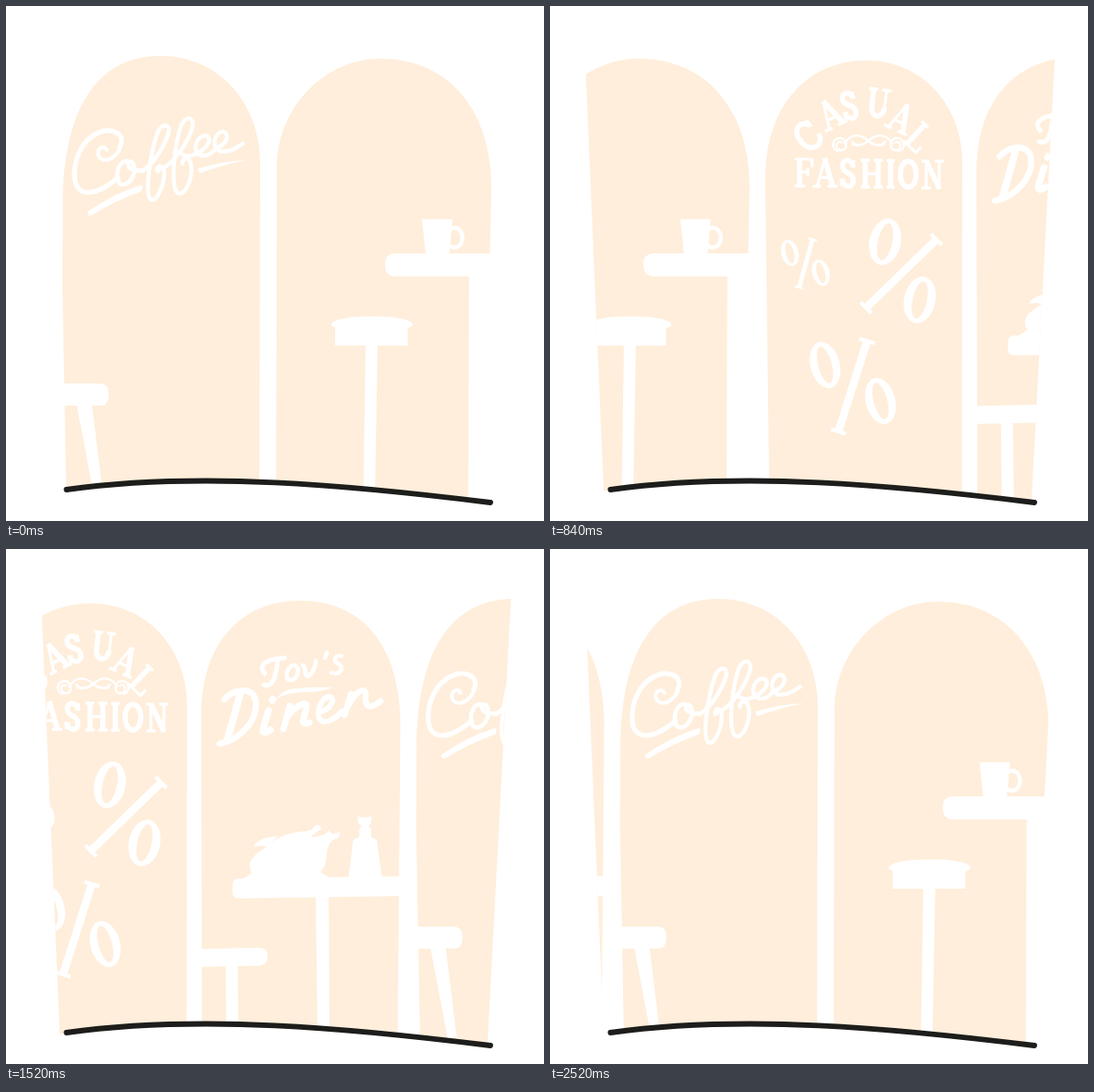
These frames come from a looping animation (582x558 px, 2.56 s). An HTML page with a canvas:

```html
<!DOCTYPE html>
<html lang="en">
<head>
<meta charset="utf-8">
<title>Passing shop windows</title>
<style>
html, body { margin: 0; width: 100%; height: 100%; overflow: hidden; background: #fff; }
canvas { display: block; }
</style>
</head>
<body>
<canvas id="stage" width="582" height="558"></canvas>
<script>
const ctx = document.getElementById('stage').getContext('2d');
const LOOP = 2560, STEP = 40, SPAN = 942;
const CREAM = '#ffeedb', WHITE = '#fff', INK = '#1d1d1b';

const frame = new Path2D('M37.6 45L546.7 45L520.8 538C370 519 210 504 65 524L58.1 526Z');
const ground = new Path2D('M65.5 524C210 504 370 519 524 538');

function fill(path, color = WHITE) {
  ctx.fillStyle = color;
  ctx.fill(new Path2D(path));
}

function stroke(width, path, cap = 'round') {
  ctx.lineWidth = width;
  ctx.lineCap = cap;
  ctx.lineJoin = cap === 'round' ? 'round' : 'miter';
  ctx.strokeStyle = WHITE;
  ctx.stroke(new Path2D(path));
}

// Slab letters, 32 units high: [width, heavy strokes, light strokes]
const GLYPHS = {
  A: [27, 'M13 0L22 31', 'M13 1L5 31M8 21H19M0 30.5H9M16 30.5H27'],
  C: [25, 'M22 9C19 -2 3 -2 3 16C3 34 20 34 23 22', 'M22.5 2V11'],
  F: [21, 'M6 0V32', 'M1 1.5H19.5V10M6 15.5H15M15 11V20M1 30.5H12'],
  H: [26, 'M6 0V32M20 0V32', 'M1 1.5H11M15 1.5H25M1 30.5H11M15 30.5H25M6 16H20'],
  I: [9, 'M4.5 0V32', 'M0 1.5H9M0 30.5H9'],
  L: [21, 'M6 0V32', 'M1 1.5H11M1 30.5H19.5V22'],
  N: [26, 'M6 1L20 31', 'M6 0V32M20 0V32M1 1.5H8M15 1.5H25M1 30.5H11'],
  O: [23, 'M3 16C3 -2.5 20 -2.5 20 16C20 34.5 3 34.5 3 16Z', ''],
  S: [17, 'M14.5 9C13 0 3 0 3 8C3 17 14.5 14 14.5 24C14.5 33 3 32 2.5 22', 'M15 2V10M2 22V30'],
  U: [25, 'M6 0V20C6 33.5 19.5 33.5 20 20', 'M20 20V0M1 1.5H11M15 1.5H25']
};

function letter(char, x, y, degrees = 0) {
  const [width, heavy, light] = GLYPHS[char];
  ctx.save();
  ctx.translate(x, y);
  ctx.rotate(degrees * Math.PI / 180);
  ctx.translate(-width / 2, -16);
  stroke(5.6, heavy, 'butt');
  stroke(3.2, light, 'butt');
  ctx.restore();
}

function zero(x, y, rx, ry, tilt) {
  ctx.beginPath();
  ctx.ellipse(x, y, rx, ry, tilt, 0, 7);
  ctx.closePath();
  ctx.moveTo(x, y);
  ctx.ellipse(x, y, rx * 0.46, ry * 0.8, tilt, 0, 7);
  ctx.fillStyle = WHITE;
  ctx.fill('evenodd');
}

function percent(zeros, rx, ry, tilt, [x1, y1, x2, y2], weight) {
  for (const [x, y] of zeros) zero(x, y, rx, ry, tilt);
  stroke(weight, `M${x1} ${y1}L${x2} ${y2}`, 'butt');
  const length = Math.hypot(x2 - x1, y2 - y1);
  const nx = (y1 - y2) / length * weight, ny = (x2 - x1) / length * weight;
  for (const [x, y] of [[x1, y1], [x2, y2]]) {
    stroke(weight / 2, `M${x - nx} ${y - ny}L${x + nx} ${y + ny}`, 'butt');
  }
}

function coffeeShop() {
  fill('M65.5 545L61 300L61.5 215C62 112 98 54 167 54C230 54 275 105 275 170L274 545Z', CREAM);
  // C, o, both f, both e
  stroke(5.2, 'M123 153C131 138 113 131 101 137C82 144 72 168 74.5 188C77 207 97 207 121 186');
  stroke(4, 'M109 156C106 150 98 154 100 162C104 171 119 167 124 152');
  stroke(4.6, 'M131 168C120 168 117 188 124 193C135 196 143 178 137 170C131 164 127 181 148 178');
  stroke(4.4, 'M147 179C160 172 172 150 176 137C178 126 167 127 163 140C156 162 150 201 156 209C163 215 172 192 171 179C170 171 162 173 164 179');
  stroke(4.4, 'M165 178C182 172 198 146 202 130C203 118 192 119 188 134C181 160 178 196 186 203C196 206 204 180 199 168C196 163 190 166 191 171');
  stroke(4.4, 'M191 161C201 166 217 156 220 146C220 136 206 140 205 153C206 166 220 164 227 154C236 151 241 144 238 138C232 132 224 142 226 151C229 163 246 157 256 149');
  fill('M88 223Q115 204 146 194Q150 196 146 201Q118 211 92 227Q88 228 88 223Z');
  fill('M208 176Q234 168 260 167Q235 172 210 181Q207 180 208 176Z');
  fill('M55 409H101Q111 409 111 419V423Q111 433 101 433H55Z');
  fill('M76.5 432H93L105 530H95Z');
}

function cafe() {
  fill('M292 545L293 175C293 110 345 57 405 57C480 57 525 115 525 195L523.5 268H501L500 545Z', CREAM);
  fill('M450 231H483L479.5 269H454Z');
  ctx.beginPath();
  ctx.ellipse(485, 251, 8.8, 10.8, 0, 0, 7);
  ctx.lineWidth = 4.4;
  ctx.strokeStyle = WHITE;
  ctx.stroke();
  fill('M528 268H420Q410 269 410 280Q410 292 420 293H528Z');
  ctx.beginPath();
  ctx.ellipse(396, 345, 44.5, 8.8, 0, 0, 7);
  ctx.fill();
  fill('M356 345H434.5V368H356Z');
  fill('M389 367H402L399 535H386.5Z');
}

function boutique() {
  fill('M237.5 545L233 200V185C233 110 277 59 342 59C403 59 446 108 446 170L445.5 545Z', CREAM);
  const arch = [[279, 141, -42], [303, 117, -27], [323.5, 108, -12], [355, 105, 7], [380, 121, 25], [399, 142, 43]];
  [...'CASUAL'].forEach((char, i) => letter(char, ...arch[i]));
  const row = [274.5, 297.5, 322, 348, 368.5, 387.5, 414];
  [...'FASHION'].forEach((char, i) => letter(char, row[i], 180.5 + i * 0.35));

  for (const side of [1, -1]) {
    ctx.save();
    ctx.translate(344.5, 0);
    ctx.scale(side, 1);
    stroke(2.4, 'M-29 148C-35 145 -37 154 -31 156C-22 158 -22 144 -30 143C-40 143 -41 155 -33 157');
    stroke(2.4, 'M-26 149C-18 137 -8 139 0 146C8 153 15 151 18 147M-17 150C-12 152 -5 151 0 146');
    ctx.restore();
  }
  percent([[259.5, 267.5], [293, 289]], 9.5, 14.5, -0.25, [269.5, 305, 284, 253], 4.8);
  percent([[362.5, 255.5], [400, 318.5]], 17, 25.5, 0.22, [342, 327, 418, 253], 8.5);
  percent([[297.5, 389], [357.5, 428]], 16, 25.5, -0.26, [312, 461, 343, 363], 8.5);
}

function diner() {
  fill('M212 545L211 180C211 100 256 56 318 56C386 56 426 105 426.5 190L423.5 545Z', CREAM);
  // Upper word, rising to the right
  stroke(5, 'M280 135C272 126 281 119 301 118M294 119C292 137 289 151 279 147');
  stroke(4.6, 'M312 126C303 126 301 142 307 142C316 142 319 128 312 126');
  stroke(4.6, 'M321 126C324 126 323 138 326 138C331 136 335 128 335 121');
  stroke(4.4, 'M347 112L345 118M363 116C357 114 352 121 359 124C366 128 363 137 352 134');
  fill('M293 162Q299 151 317 151Q335 149 353 150Q343 155 323 155Q306 155 293 162Z');
  // Lower word
  stroke(8, 'M253 158L239 208');
  stroke(6.6, 'M236 163C247 151 267 149 270 164C273 184 255 206 231 211');
  stroke(7.5, 'M284 175L278 195Q277 202 286 196M288 164L288.5 163');
  stroke(7, 'M307 170L300 195M303 184C309 173 324 163 325 170C325 178 315 193 328 188');
  stroke(6, 'M341 176C352 173 357 161 349 160C339 161 333 184 343 187C350 188 358 182 363 176');
  stroke(6.5, 'M373 157L366 180M369 172C375 159 386 148 389 156C388 167 389 177 405 165');

  // Roast and shaker
  fill('M257 357L266 351Q260 342 268 333Q274 327 282 323Q274 320 268 323Q269 317 281 313L294 311L287 318Q300 308 320 306Q331 306 334 300Q339 297 341 304Q333 308 330 312Q345 312 349 305L353 309L361 307Q361 314 356 314Q348 318 347 330Q347 343 340 350L351 357Z');
  fill('M380 289.5Q388 292 396 289.5L394.5 298L392 300L395 304V312L401 315L407 358H370L375.5 315L382 312V304L385 300L381.5 298Z');
  fill('M432 354.5L252 357Q245 357 245 364V372Q245 379 253 378.5L432 376Z');
  fill('M335 376H349L350 535H337Z');
  fill('M205 433.5L273 432Q283 432 283 441Q283 451 273 451.5L205 453Z');
  fill('M237.5 450H250.5L251.5 535H238.5Z');
}

const scenes = [[coffeeShop, 0], [cafe, 0], [boutique, 309.1], [diner, 559.4]];

function draw(time) {
  const shift = Math.floor(time % LOOP / STEP) * STEP / LOOP * SPAN;
  ctx.fillStyle = WHITE;
  ctx.fillRect(0, 0, 582, 558);
  ctx.save();
  ctx.clip(frame);
  for (const lap of [0, SPAN]) {
    for (const [paint, offset] of scenes) {
      ctx.save();
      ctx.translate(offset + lap - shift, 0);
      paint();
      ctx.restore();
    }
  }
  ctx.restore();
  ctx.lineWidth = 6;
  ctx.lineCap = 'round';
  ctx.strokeStyle = INK;
  ctx.stroke(ground);
}

const start = performance.now();
function tick() {
  draw(performance.now() - start);
  requestAnimationFrame(tick);
}
tick();
</script>
</body>
</html>
```
